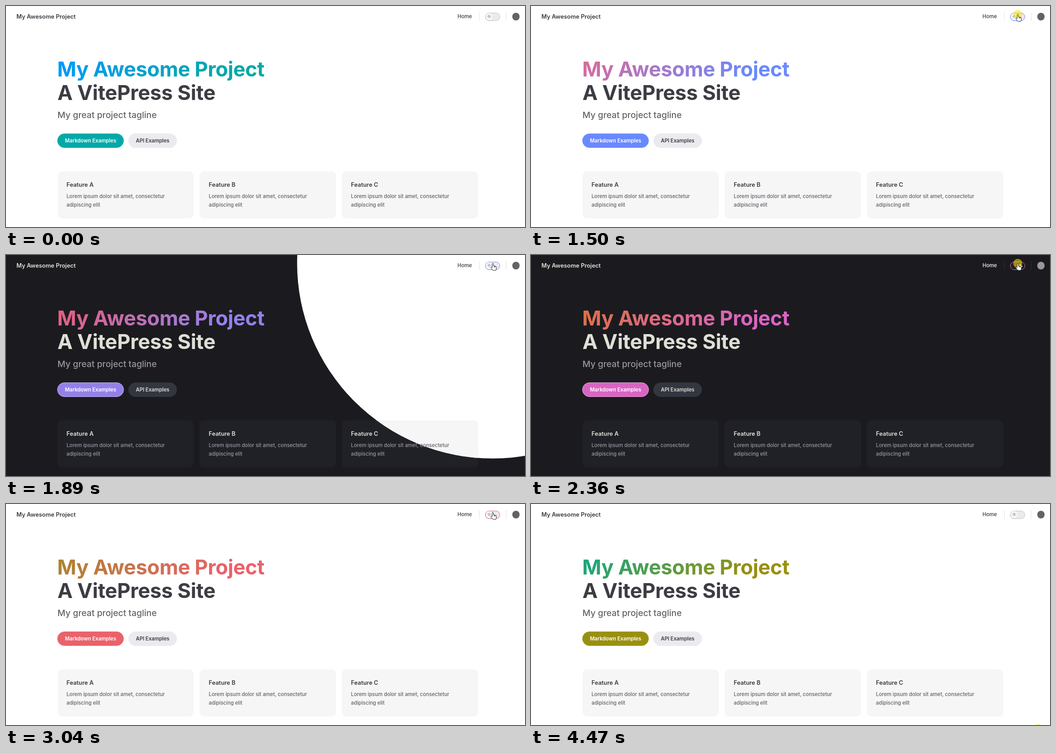
Write an HTML page that moves like this. It is 1145 px wide and 489 px high and loops after 4.55 s.

```html
<!DOCTYPE html>
<html lang="en">
<head>
<meta charset="utf-8">
<title>My Awesome Project</title>
<style>
  html, body { margin: 0; width: 100%; height: 100%; overflow: hidden; background: #fff; }
  body {
    position: relative;
    font: 500 11.27px/19.3px Inter, sans-serif;
    font-optical-sizing: none;
    white-space: nowrap;
  }
  .page, .page *, #overlay { position: absolute; box-sizing: border-box; }
  .page { inset: 0; overflow: hidden; background: var(--bg); color: var(--text); }
  .light {
    --bg: #fff; --text: #3c3c43; --soft: #626267; --home: #3c3c43; --card: #f6f6f7;
    --alt: #ebebef; --line: #e2e2e3; --track: #ebebef; --edge: #c2c2c4; --knob: #fff;
    --rim: 20%;
  }
  .dark {
    --bg: #1b1b1f; --text: #dfdfd6; --soft: #98989f; --home: #f5f5ec; --card: #202127;
    --alt: #32363f; --line: #2e2e32; --track: #202127; --edge: #3c3f44; --knob: #161618;
    --rim: 45%;
  }
  .logo { left: 23px; top: 14px; font-size: 12.88px; font-weight: 600; }
  .home { left: 996px; top: 13.6px; color: var(--home); }
  .rule { top: 13.5px; width: 1px; height: 19.5px; background: var(--line); }
  .switch {
    left: 1057px; top: 14.5px; width: 33px; height: 18px;
    border: 1px solid var(--edge); border-radius: 9px; background: var(--track);
  }
  .hover .switch { border-color: var(--brand); }
  .knob {
    left: 1px; top: .8px; width: 14.4px; height: 14.4px; border-radius: 50%;
    background: var(--knob); box-shadow: 0 1px 2px #0001;
  }
  .dark .knob { left: 15.6px; }
  .knob svg { left: 2.2px; top: 2.2px; width: 10px; height: 10px; fill: none; stroke: var(--soft); }
  .light .moon, .dark .sun { display: none; }
  .dark .moon { fill: var(--text); stroke: none; }
  .badge {
    left: 1116.5px; top: 15.2px; width: 16.4px; height: 16.4px;
    border-radius: 50%; background: var(--soft);
  }
  .hero { left: 113.5px; font-size: 45.1px; line-height: 51.5px; font-weight: 700; }
  .name {
    left: 113px; top: 113.8px; width: 592px; color: transparent; letter-spacing: -.34px;
    background: linear-gradient(315deg, var(--brand) 38%, var(--next));
    -webkit-background-clip: text; background-clip: text;
  }
  .headline { top: 166.2px; letter-spacing: -.24px; }
  .tagline { left: 113.5px; top: 227.4px; font-size: 19.3px; line-height: 29px; color: var(--soft); }
  .button {
    top: 282px; height: 32px; line-height: 30.4px; border-radius: 16px;
    border: 1px solid transparent; font-weight: 600; text-align: center;
  }
  .primary {
    left: 113px; width: 147px; color: #fff; background: var(--brand);
    border-color: color-mix(in srgb, var(--brand), #fff var(--rim));
  }
  .second { left: 270px; width: 107px; background: var(--alt); }
  .card { top: 365.7px; width: 300.6px; height: 104.6px; border-radius: 9.7px; background: var(--card); }
  .card b { left: 20px; top: 20px; font-size: 12.88px; font-weight: 600; }
  .card p { left: 20px; top: 46px; margin: 0; color: var(--soft); }
  #overlay { inset: 0; width: 100%; height: 100%; }
</style>
</head>
<body>
<template id="page">
  <div class="logo">My Awesome Project</div>
  <div class="home">Home</div>
  <div class="rule" style="left:1043.5px"></div>
  <div class="switch"><div class="knob">
    <svg class="sun" viewBox="-5 -5 10 10"><circle r="1.9" stroke-width=".9"/><path d="M0-4.7v1.2M0 3.5v1.2M-4.7 0h1.2M3.5 0h1.2M-3.3-3.3l.8.8M2.5 2.5l.8.8M-3.3 3.3l.8-.8M2.5-2.5l.8-.8"/></svg>
    <svg class="moon" viewBox="-5 -5 10 10"><path d="M-.6-4A4 4 0 1 0 4 1.2 4 4 0 0 1-.6-4z"/></svg>
  </div></div>
  <div class="rule" style="left:1102.5px"></div>
  <div class="badge"></div>
  <div class="hero name">My Awesome Project</div>
  <div class="hero headline">A VitePress Site</div>
  <div class="tagline">My great project tagline</div>
  <div class="button primary">Markdown Examples</div>
  <div class="button second">API Examples</div>
</template>
<div class="page dark"></div>
<div class="page light"></div>
<svg id="overlay">
  <circle id="press" r="10" fill="rgb(255,230,10)" fill-opacity=".55"/>
  <g id="cursor" fill="#fff" stroke="#222" stroke-width="1" stroke-linejoin="round">
    <path id="arrow" d="M0 0V10.2L2.4 8 4 11.8l1.7-.7L4.1 7.4H7.2z"/>
    <path id="hand" d="M-1.4 9.5V1.3C-1.4-.4 1.3-.4 1.3 1.3V5.6l5.2 1.1c1.4.3 1.9 1.2 1.7 2.4l-.8 4.2-1 2.2H.2L-4 10.3c-1-1.3.4-2.6 1.6-1.8z M3.2 6v3M5.4 6.5v2.7"/>
  </g>
</svg>
<script>
const LOOP = 4550;
const SPOT = { x: 1074, y: 18.5 };
const FULL = Math.hypot(SPOT.x, 489 - SPOT.y);
const WIPE = 300;
const DARKEN = 1612.5, LIGHTEN = 2448.2;

// Screen updates: first time, last time, count
const updates = [
  [0, 540, 9], [610, 1090, 8], [1150, 1570, 7], [1710, 2210, 9], [2290, 2690, 7],
  [2780, 2780, 1], [2830, 3310, 8], [3380, 3860, 8], [3930, 4400, 8], [4470, 4470, 1]
].flatMap(([from, to, n]) => Array.from({ length: n }, (_, i) =>
  Math.round((from + (to - from) * i / Math.max(1, n - 1)) / 10) * 10));

const rgb = hex => [1, 3, 5].map(i => parseInt(hex.slice(i, i + 2), 16));

// Time, brand colour, next colour
const rainbow = [
  [0, '#00a9a7', '#0097ff'],
  [950, '#009ff7', '#b26fd0'],
  [1570, '#7686ff', '#e56890'],
  [1770, '#8c84f0', '#ea5c80'],
  [2360, '#da64c4', '#dd7140'],
  [2690, '#f35788', '#cf7a28'],
  [3720, '#d97630', '#5f9b3a'],
  [4470, '#999010', '#10a982']
].map(([t, brand, next]) => [t, ...rgb(brand), ...rgb(next)]);

const route = [
  [470, 1038, 496], [950, 1060, 45], [1090, SPOT.x, SPOT.y],
  [3280, SPOT.x, SPOT.y], [3720, 1042, 484], [3800, 1040, 496]
];

const presses = [
  [1440, 1700, SPOT.x, SPOT.y],
  [2290, 2425, SPOT.x, SPOT.y],
  [4470, LOOP, 1119.5, 496.5]
];

const clamp = v => Math.min(1, Math.max(0, v));
const find = id => document.getElementById(id);
const show = (el, on) => { el.style.display = on ? '' : 'none'; };

function sample(table, t) {
  const i = table.findIndex(row => row[0] > t);
  if (i === 0) return table[0].slice(1);
  if (i < 0) return table[table.length - 1].slice(1);
  const a = table[i - 1], b = table[i];
  const k = (t - a[0]) / (b[0] - a[0]);
  return a.slice(1).map((v, j) => v + (b[j + 1] - v) * k);
}

function build(page) {
  page.append(find('page').content.cloneNode(true));
  ['A', 'B', 'C'].forEach((letter, i) => {
    const card = document.createElement('div');
    card.className = 'card';
    card.style.left = 113.5 + 313.8 * i + 'px';
    card.innerHTML = `<b>Feature ${letter}</b>
      <p>Lorem ipsum dolor sit amet, consectetur<br>adipiscing elit</p>`;
    page.append(card);
  });
}

function paint(page, t, hover) {
  const c = sample(rainbow, t);
  page.style.setProperty('--brand', `rgb(${c.slice(0, 3)})`);
  page.style.setProperty('--next', `rgb(${c.slice(3)})`);
  page.classList.toggle('hover', hover);
}

const dark = document.querySelector('.dark');
const light = document.querySelector('.light');
[dark, light].forEach(build);

function lightRadius(t) {
  const ease = start => clamp((t - start) / WIPE) ** 1.66;
  return FULL * (t < LIGHTEN ? 1 - ease(DARKEN) : ease(LIGHTEN));
}

function render(t) {
  const radius = lightRadius(t);
  const over = t >= 1090 && t < 3310;
  const growing = t >= LIGHTEN && t < LIGHTEN + WIPE;
  // The outgoing page is a still picture during each wipe
  paint(light, t > 1570 && t < DARKEN + WIPE ? 1570 : t, over && !growing);
  paint(dark, Math.min(t, 2420), over);
  light.style.clipPath = radius < FULL ? `circle(${radius}px at ${SPOT.x}px ${SPOT.y}px)` : 'none';

  const [x, y] = sample(route, t);
  find('cursor').setAttribute('transform', `translate(${x} ${y})`);
  show(find('hand'), over);
  show(find('arrow'), !over);

  const press = presses.find(([from, to]) => t >= from && t < to);
  show(find('press'), press);
  if (press) {
    find('press').setAttribute('cx', press[2]);
    find('press').setAttribute('cy', press[3]);
  }
}

const start = performance.now();
function tick() {
  const t = (performance.now() - start) % LOOP;
  render(updates.filter(u => u <= t).pop());
  requestAnimationFrame(tick);
}
tick();
</script>
</body>
</html>
```
